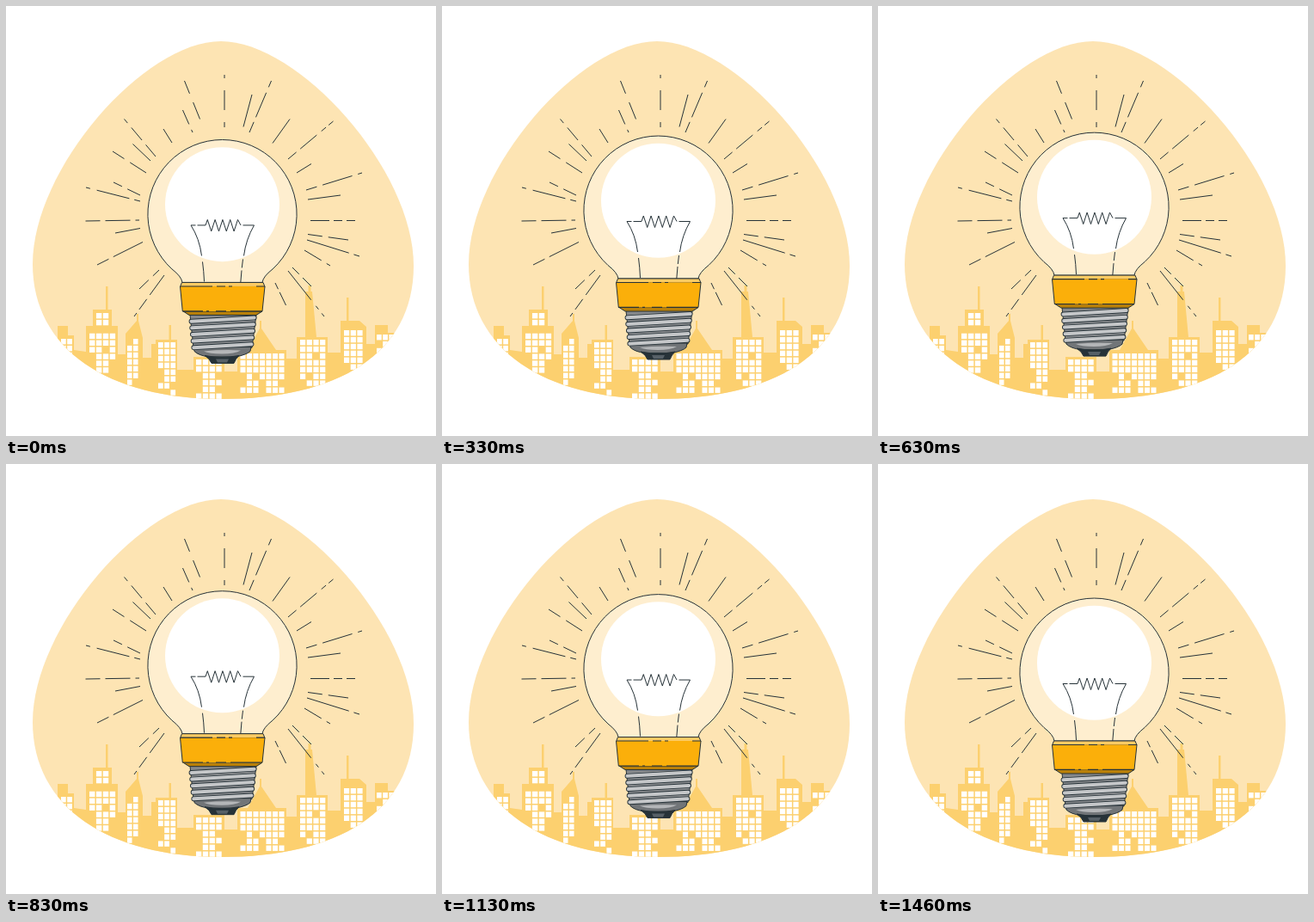
Animation of 500x500 px, one loop 1.5 s. Source, as an HTML page with a canvas:

```html
<!DOCTYPE html>
<html lang="en">
<head>
<meta charset="utf-8">
<title>Light bulb over the city</title>
<style>
html, body { margin: 0; width: 100%; height: 100%; overflow: hidden; background: #fff; }
canvas { display: block; width: 500px; height: 500px; }
</style>
</head>
<body>
<canvas id="stage" width="500" height="500"></canvas>
<script>
const ctx = document.getElementById('stage').getContext('2d');
const LOOP = 1500, STEPS = 36, RISE = 10;
const INK = '#263238', SKY = '#fde4b3', CITY = '#fcd06f', AMBER = '#fbaf0a';

const blob = new Path2D('M250 41C340 41 474 190 474 302C474 405 385 457 250 457C120 457 31 400 31 300C31 190 160 41 250 41Z');

const skyline = new Path2D(`M20 400H60V372H72V383H79V400L93 402V372H101V353H116V326H118.500V353H123V372H130V405H139V381
  L152 366V358H154V366L159 386V409H169V393H174V388H189.500V371H192V388H199V423H218V408H254V425H269V400H281
  L295 375V366H297V375L314 400H326V410H338V385H348V332H351.500V325H354.500V332H356L361 385H374V403H389V366H396V339H398.500
  V366H411L419 373V393H429V371H444V380H454V400H480V470H20Z`);

// x, y, column pitch, rows of windows
const windows = [
  [64, 387, 7.2, '## ## ##'],
  [97, 357, 7.9, '.##. .##. .... #### #### ##.# .### .##. .##.'],
  [141, 387, 7, '.# ## ## ## ## ## #.'],
  [177, 391, 7.2, '### ### ### ### .## .## ##. ..#'],
  [221, 411, 7.8, '#### #### .##. .### .##. ####'],
  [272.500, 404, 7.5, '####### ####### ####### .#.#### .##.##. ###.###'],
  [342, 388, 7.7, '#### #### ##.# #### #### #.## .### ..##'],
  [393, 377, 7.7, '### ### ### ### ### .##'],
  [431, 382, 7.2, '### .## ##.']
];

// x1, y1, x2, y2, dash lengths
const raysLeft = [
  [254, 80, 254, 141, 4, 14, 23, 14, 6],
  [207.5, 87, 225.5, 131.5, 16, 11, 21],
  [205.5, 121, 217, 147, 18, 7, 4],
  [137.5, 131.5, 174, 175, 6, 7, 19, 7, 18],
  [147.5, 160.5, 168, 180],
  [183, 143, 193, 159],
  [124, 169, 163, 194, 16, 8, 23],
  [125, 205, 156, 220, 11, 7, 17],
  [93, 211, 156, 227, 5, 8, 39, 6, 7],
  [92.5, 250, 155, 249, 17, 6, 29, 6, 5],
  [127, 264, 156, 258.5],
  [106, 301, 159, 274.5, 15, 6, 39],
  [155, 329, 178, 307, 15, 7, 10],
  [149, 361, 184, 313, 5, 5, 15, 6, 29]
];
const raysRight = [
  [308.5, 87, 283, 147, 8, 7, 31, 6, 14],
  [286, 103, 276, 140.5],
  [330, 131.5, 310, 159.5],
  [380.5, 134, 328, 178, 7, 4, 7, 7, 25, 6, 13],
  [355, 183.5, 338, 194],
  [414, 194, 349, 214, 5, 7, 36, 7, 14],
  [389, 220, 351, 225],
  [354, 249.5, 406, 249.5, 22, 5, 10, 5, 10],
  [351, 265.5, 398, 272, 17, 7, 24],
  [350, 272, 411, 291, 51, 6, 8],
  [347, 284, 377, 302, 23, 7, 6],
  [333, 304, 355, 326, 11, 6, 15],
  [328, 308, 370, 361, 43, 9, 5, 6, 6],
  [313, 322, 325.5, 348, 8, 4, 18]
];

const glass = new Path2D('M205 322Q204 315 193 306.500A86.600 86.600 0 1 1 310 306.500Q299 315 298 322Z');

function shape(path, fill, width) {
  const p = path instanceof Path2D ? path : new Path2D(path);
  if (fill) { ctx.fillStyle = fill; ctx.fill(p); }
  if (width) { ctx.lineWidth = width; ctx.strokeStyle = INK; ctx.stroke(p); }
}

function line(x1, y1, x2, y2, ...dash) {
  ctx.setLineDash(dash.length ? [...dash, 500] .concat(dash.length % 2 ? [] : [0]) : []);
  ctx.beginPath();
  ctx.moveTo(x1, y1);
  ctx.lineTo(x2, y2);
  ctx.stroke();
  ctx.setLineDash([]);
}

function drawWindows(x, y, pitch, rows) {
  rows.split(' ').forEach((row, r) => [...row].forEach((cell, c) => {
    if (cell === '#') ctx.fillRect(x + c * pitch, y + r * 7.9, pitch - 1.5, 6.4);
  }));
}

function drawScene() {
  ctx.fillStyle = '#fff';
  ctx.fillRect(0, 0, 500, 500);
  ctx.save();
  shape(blob, SKY);
  ctx.clip(blob);
  shape(skyline, CITY);
  ctx.fillStyle = '#fff';
  windows.forEach(w => drawWindows(...w));
  ctx.restore();
  ctx.strokeStyle = INK;
  ctx.lineWidth = 1;
  [...raysLeft, ...raysRight].forEach(r => line(...r));
}

function drawFilament() {
  let zigzag = 'M215 255.500H220.500M222.500 255.500H232';
  for (let i = 0; i < 9; i++) zigzag += `L${234.3 + i * 4.4} ${i % 2 ? 262.5 : 249}`;
  zigzag += 'L273 255.500M275.500 255.500H288.500';
  shape(zigzag, null, 1);
  shape('M215 255.500Q225 271 227.500 291M228.500 298Q230 309 230.500 321', null, 1);
  shape('M288.500 255.500Q279 272 276.500 291M275.500 295L274.300 305M274 308L272.800 322', null, 1);
}

function drawScrew() {
  shape('M214 359.500H291L286 398H218Z', '#85888b', 1);
  shape('M218 397L219 402Q224 407 236 408.500H267Q280 406 284 402L285 397Z', '#717578', 1);
  shape('M230 402Q251 400 273 401Q266 405 251 405Q236 405 230 402Z', '#b4b6b8');
  shape('M231 407Q251 411 271 407L267.500 411L265 416H239L236 411Z', INK, 1);
  shape('M244 411H259L257 415H246Z', '#566067');
  ctx.lineCap = 'round';
  for (let i = 0; i < 5; i++) {
    const bar = [215.5 + i * 0.7, 367.3 + i * 7.6, 288.7 - i * 0.8, 363 + i * 7.7];
    ctx.strokeStyle = INK;
    ctx.lineWidth = 5.8;
    line(...bar);
    ctx.strokeStyle = '#c5c7c9';
    ctx.lineWidth = 4;
    line(...bar);
  }
  ctx.lineCap = 'butt';
}

function drawBulb() {
  shape(glass, '#feeecf', 1);
  ctx.beginPath();
  ctx.arc(251.5, 231.2, 66.5, 0, Math.PI * 2);
  ctx.fillStyle = '#fff';
  ctx.fill();
  drawFilament();
  drawScrew();
  shape('M206 355.500H298L291 360H213Z', '#b98009', 1);
  shape('M204.500 322H299L301 327H202.500Z', '#fccb64', 1);
  shape('M202.500 326.500H301L298 355.500H205.300Z', AMBER);
  shape('M202.500 326.500L205.300 355.500M301 326.500L298 355.500', null, 1);
  ctx.strokeStyle = INK;
  ctx.lineWidth = 1.1;
  line(203, 326.5, 301, 326.5, 37, 5, 10, 4, 4, 28, 10);
  line(205, 355.4, 298, 355.4, 24, 4, 3, 8, 12, 5, 37);
}

function draw(now) {
  const step = Math.floor((now % LOOP + 4.9) / (LOOP / STEPS)) % STEPS;
  const phase = (step + 1) % STEPS / STEPS;
  const lift = RISE * (1 - Math.abs(1 - 2 * phase));
  drawScene();
  ctx.save();
  ctx.translate(0, -lift);
  drawBulb();
  ctx.restore();
}

const start = performance.now();
function tick() {
  draw(performance.now() - start);
  requestAnimationFrame(tick);
}
tick();
</script>
</body>
</html>
```
